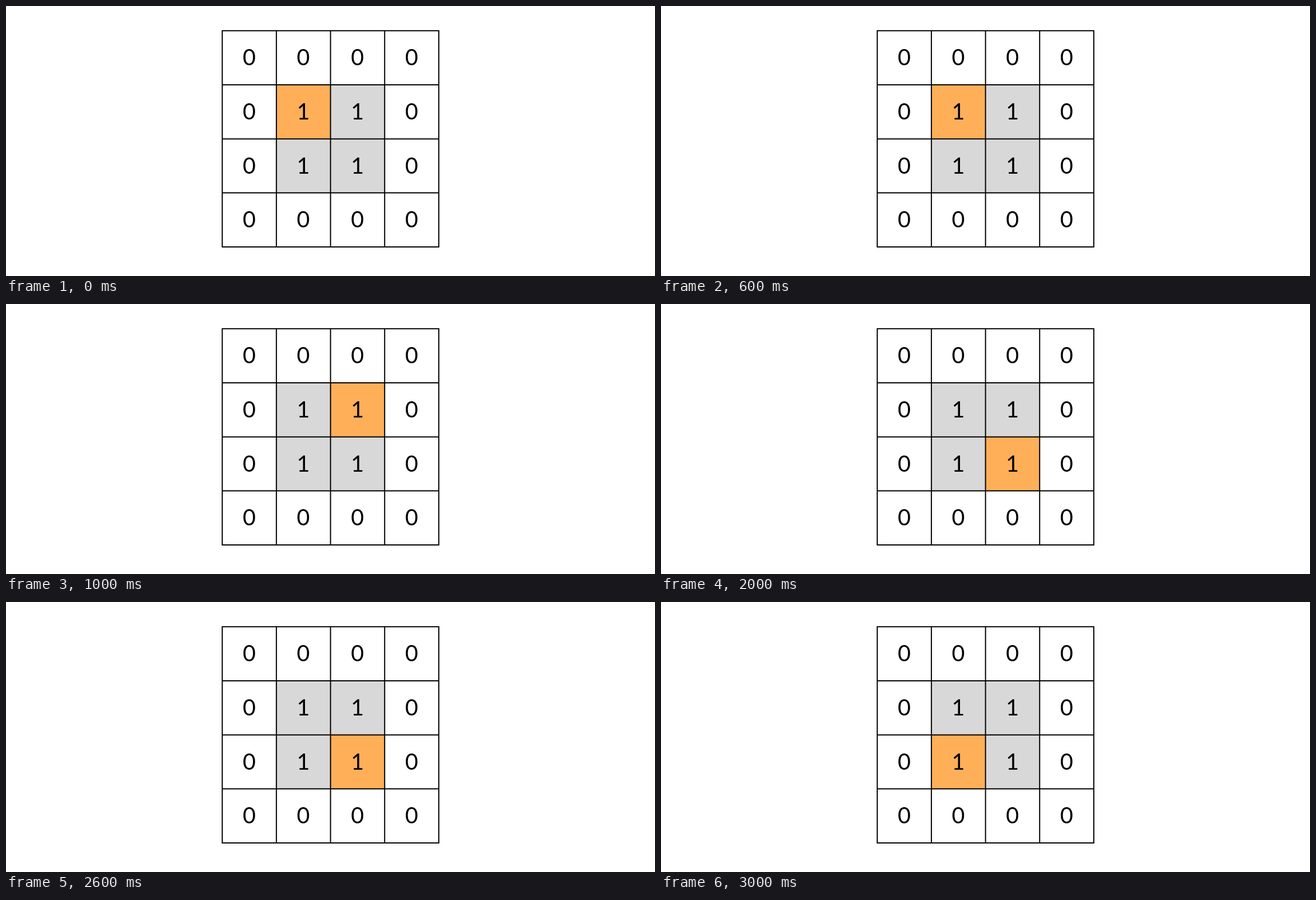
An HTML page for the animation above (4000 ms loop, 1159x483 px).

```html
<!DOCTYPE html>
<html lang="en">
<head>
<meta charset="utf-8">
<title>Grid walk</title>
<style>
  html, body { margin: 0; width: 100%; height: 100%; overflow: hidden; background: #fff; }
  svg { display: block; }
  text { font: 40px Lato, sans-serif; text-anchor: middle; }
  path { fill: none; stroke: #000; stroke-width: 2; }
</style>
</head>
<body>
<svg width="1159" height="483" viewBox="0 0 1159 483"></svg>
<script>
const svg = document.querySelector("svg");
const left = 386.2, top0 = 44.3, cell = 96.67, count = 4, size = cell * count;
const isInner = i => i === 1 || i === 2;

function add(tag, attrs, text = "") {
  const el = document.createElementNS("http://www.w3.org/2000/svg", tag);
  for (const key in attrs) el.setAttribute(key, attrs[key]);
  el.textContent = text;
  return svg.appendChild(el);
}

// Inner cells in clockwise order
const blocks = [[1, 1], [2, 1], [2, 2], [1, 2]].map(([col, row]) =>
  add("rect", { x: left + col * cell, y: top0 + row * cell, width: cell, height: cell }));

let lines = `M${left} ${top0}h${size}v${size}h${-size}z`;
for (let i = 1; i < count; i++) {
  lines += `M${left + i * cell} ${top0}v${size}M${left} ${top0 + i * cell}h${size}`;
}
add("path", { d: lines });

for (let row = 0; row < count; row++) {
  for (let col = 0; col < count; col++) {
    add("text", { x: left + (col + 0.5) * cell - 0.3, y: top0 + row * cell + 62 },
      isInner(row) && isInner(col) ? "1" : "0");
  }
}

function draw() {
  const active = Math.floor(performance.now() / 1000) % blocks.length;
  blocks.forEach((block, i) => block.setAttribute("fill", i === active ? "#ffaf58" : "#d8d8d8"));
  requestAnimationFrame(draw);
}
draw();
</script>
</body>
</html>
```
